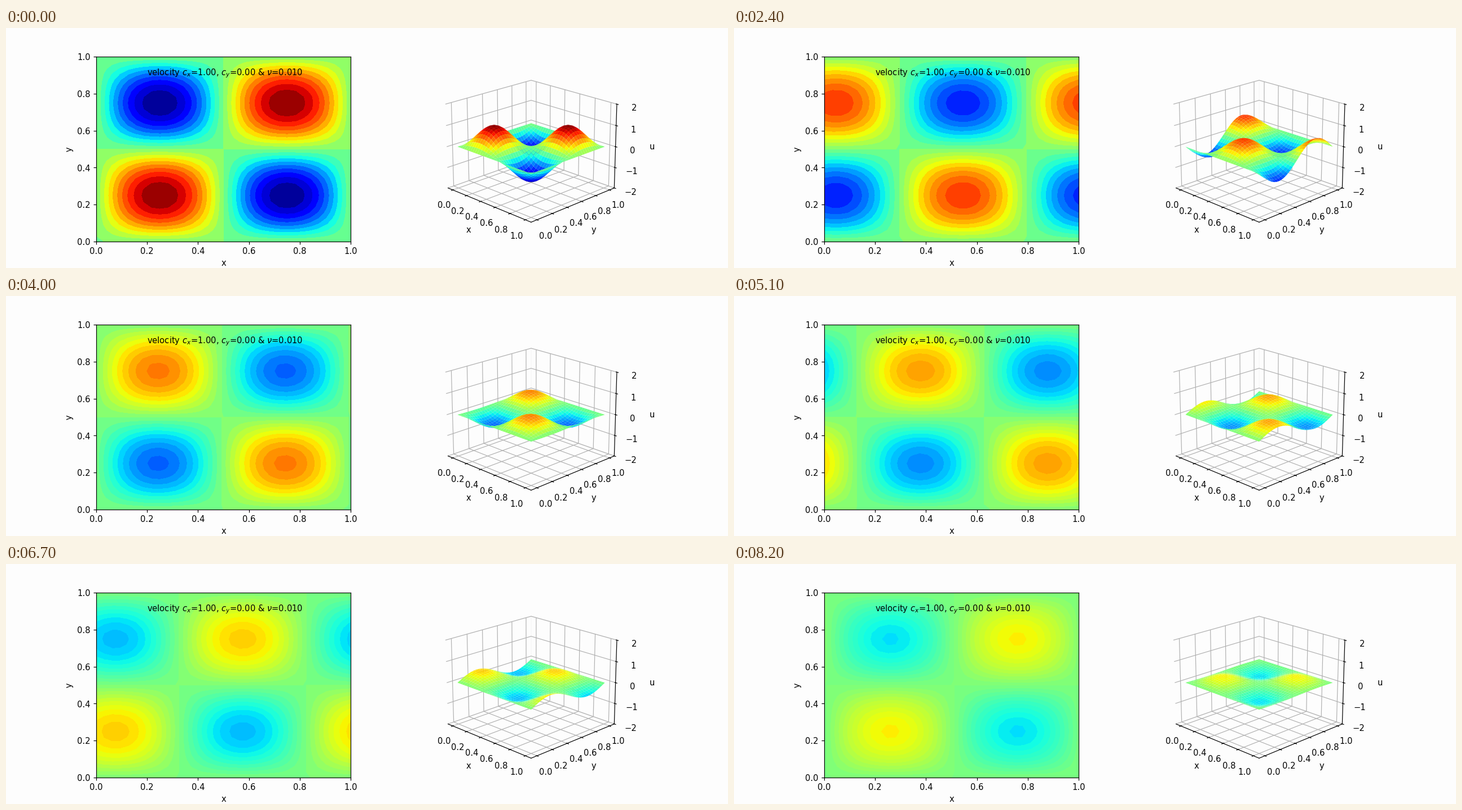
Animation of 1280x427 px, one loop 8300 ms. Source, as a matplotlib script:

```python
import numpy as np
import matplotlib.pyplot as plt
from matplotlib.animation import FuncAnimation

FRAMES, INTERVAL = 83, 100
DRIFT = 0.01232   # distance travelled per frame
DECAY = 0.01435   # logarithmic damping per frame
PAPER = "#fdfdfd"
STYLE = dict(cmap="jet", vmin=-1, vmax=1)

axis = np.linspace(0, 1, 33)
X, Y = np.meshgrid(axis, axis)


def wave(n):
    shape = np.sin(2 * np.pi * (X - DRIFT * n)) * np.sin(2 * np.pi * Y)
    return np.exp(-DECAY * n) * shape


fig = plt.figure(figsize=(12, 4.0035), dpi=320 / 3, facecolor=PAPER)

flat = fig.add_subplot(1, 2, 1)
flat.set(xlabel="x", ylabel="y", xlim=(0, 1), ylim=(0, 1))
flat.text(0.2, 0.9, r"velocity $c_x$=1.00, $c_y$=0.00 & $\nu$=0.010")

solid = fig.add_subplot(1, 2, 2, projection="3d", facecolor=PAPER)
solid.view_init(elev=20, azim=-45)
solid.set(xlabel="x", ylabel="y", zlabel="u")
solid.set_zlim(-2, 2)
solid.set_zticks(range(-2, 3))
for side in (solid.xaxis, solid.yaxis, solid.zaxis):
    side.pane.fill = False

drawn = []


def draw(n):
    while drawn:
        drawn.pop().remove()
    u = wave(n)
    drawn.append(flat.contourf(X, Y, u, 20, **STYLE))
    drawn.append(solid.plot_surface(X, Y, u, rstride=1, cstride=1, **STYLE))
    return []


def start():
    return draw(0)


anim = FuncAnimation(fig, draw, frames=FRAMES, init_func=start,
                     interval=INTERVAL, repeat=True, repeat_delay=0,
                     blit=False)
plt.show()
```
